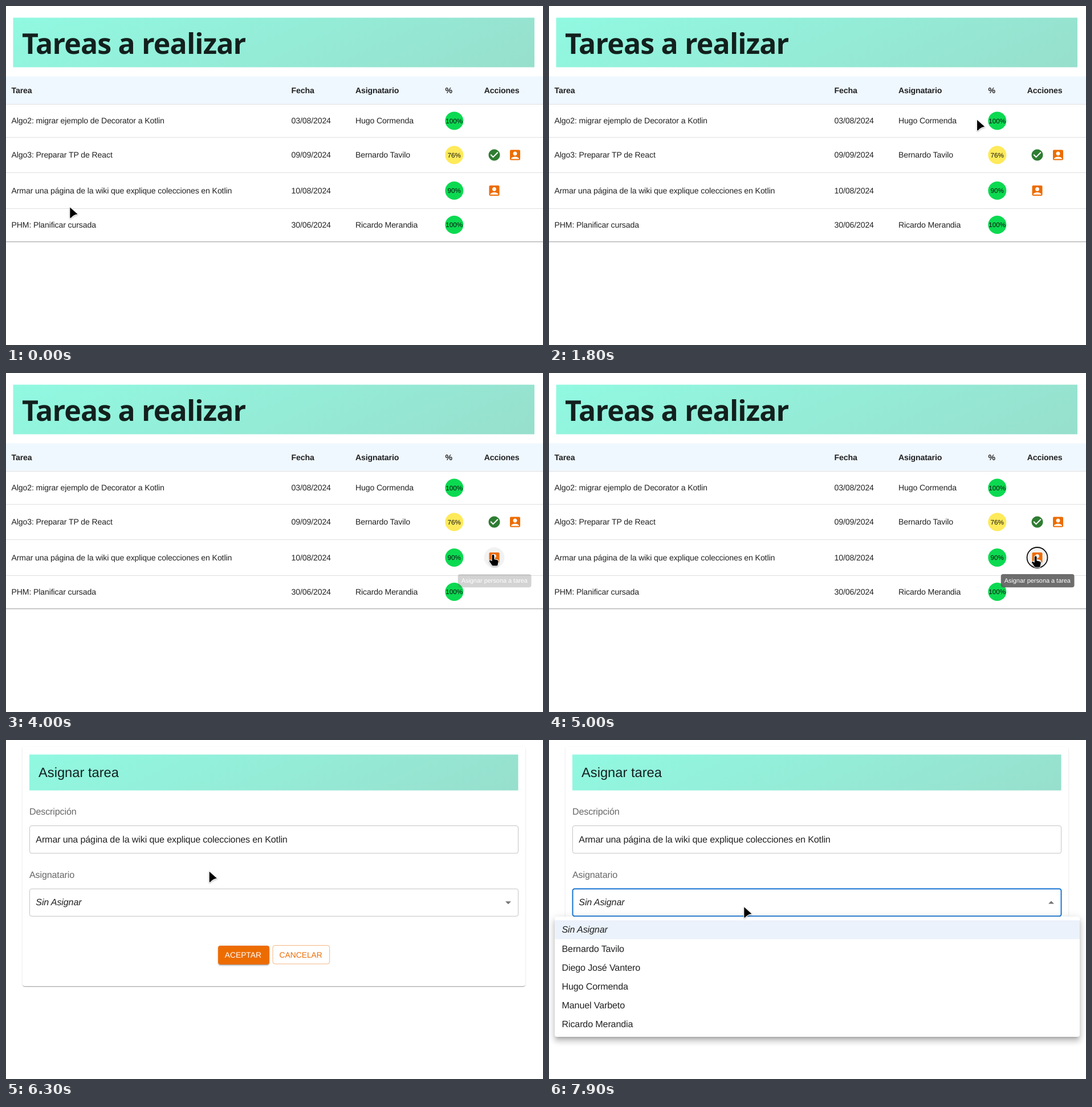
These frames come from a looping animation (942x595 px, 8000 ms). An HTML page:

```html
<!DOCTYPE html>
<html lang="es">
<head>
<meta charset="utf-8">
<title>Tareas a realizar</title>
<style>
  html, body { margin: 0; width: 100%; height: 100%; overflow: hidden; background: #fff; }
  #stage { position: relative; width: 942px; height: 595px; overflow: hidden; background: #fff; }
  #stage div, #stage svg { position: absolute; }
  #stage svg { left: 0; top: 0; overflow: visible; }
  .screen { left: 0; top: 0; width: 942px; height: 595px; }
  #card { left: 28.5px; top: 12px; width: 882.5px; height: 420px; border-radius: 4px;
    box-shadow: 0 2px 1px -1px rgba(0,0,0,.2), 0 1px 1px rgba(0,0,0,.14), 0 1px 3px rgba(0,0,0,.12); }
  #accept { left: 371.5px; top: 360.5px; width: 90px; height: 33px; border-radius: 4px; background: #ed6c02;
    box-shadow: 0 3px 1px -2px rgba(0,0,0,.2), 0 2px 2px rgba(0,0,0,.14), 0 1px 5px rgba(0,0,0,.12); }
  #menu { left: 9.5px; top: 310px; width: 921px; height: 211px; border-radius: 4px; background: #fff;
    transform-origin: 460.5px -5px;
    box-shadow: 0 5px 5px -3px rgba(0,0,0,.2), 0 8px 10px 1px rgba(0,0,0,.14), 0 3px 14px 2px rgba(0,0,0,.12); }
  text { font-family: "Liberation Sans", Arial, sans-serif; fill: rgba(0,0,0,.87);
    text-rendering: geometricPrecision; white-space: pre; }
  .cell { font-size: 14.1px; letter-spacing: -.12px; }
  .head { font-weight: 700; }
  .pct { font-size: 11.7px; text-anchor: middle; fill: #111; }
  .title { font: 700 50px "Noto Sans", "Open Sans", sans-serif; letter-spacing: -.85px; }
  .h5 { font-size: 23.7px; }
  .body { font-size: 16.1px; letter-spacing: -.14px; }
  .label { fill: rgba(0,0,0,.6); }
  .it { font-style: italic; }
  .btn { font-size: 13.8px; }
  .tip { font-size: 10.9px; fill: #fff; }
  .field { fill: none; stroke: #c4c4c4; }
  #cursor path { stroke-linejoin: round; }
  #cursor { filter: drop-shadow(0 1px 1px rgba(0,0,0,.3)); }
</style>
</head>
<body>
<div id="stage">
  <div id="list" class="screen">
    <svg id="listArt" width="942" height="595"></svg>
  </div>
  <div id="form" class="screen">
    <div id="card"></div>
    <div id="accept"></div>
    <svg id="formArt" width="942" height="595"></svg>
  </div>
  <div id="menu"><svg id="menuArt" width="921" height="211"></svg></div>
  <svg id="cursor" width="942" height="595"></svg>
</div>
<script>
const $ = id => document.getElementById(id);
const text = (x, y, s, cls) => `<text x="${x}" y="${y}" class="${cls}">${s}</text>`;
const rect = (x, y, w, h, attrs) => `<rect x="${x}" y="${y}" width="${w}" height="${h}" ${attrs}/>`;
const icon = (x, y, d, color) => `<path transform="translate(${x - 12} ${y - 12})" d="${d}" fill="${color}"/>`;

// Mint band with a slanted gradient that runs from corner to corner
function banner(id, x, y, w, h) {
  const a = 155 * Math.PI / 180, dx = Math.sin(a), dy = -Math.cos(a);
  const half = (w * dx + h * dy) / 2, cx = x + w / 2, cy = y + h / 2;
  return `<linearGradient id="${id}" gradientUnits="userSpaceOnUse" x1="${cx - dx * half}" y1="${cy - dy * half}"
    x2="${cx + dx * half}" y2="${cy + dy * half}"><stop stop-color="#91f9e1"/><stop offset="1" stop-color="#97dfcd"/>
    </linearGradient>` + rect(x, y, w, h, `fill="url(#${id})"`);
}

const GREEN = '#0bda51', YELLOW = '#feea5a', ORANGE = '#ed6c02';
const PERSON = 'M19 3H5c-1.11 0-2 .9-2 2v14c0 1.1.89 2 2 2h14c1.1 0 2-.9 2-2V5c0-1.1-.9-2-2-2z' +
  'm-7 3c1.93 0 3.5 1.57 3.5 3.5S13.93 13 12 13s-3.5-1.57-3.5-3.5S10.07 6 12 6z' +
  'm7 13H5v-.23c0-.62.28-1.2.76-1.58C7.47 15.82 9.64 15 12 15s4.53.82 6.24 2.19c.48.38.76.97.76 1.58V19z';
const CHECK = 'M12 2C6.48 2 2 6.48 2 12s4.48 10 10 10 10-4.48 10-10S17.52 2 12 2z' +
  'm-2 15l-5-5 1.41-1.41L10 14.17l7.59-7.59L19 8l-9 9z';

const people = ['Bernardo Tavilo', 'Diego José Vantero', 'Hugo Cormenda', 'Manuel Varbeto', 'Ricardo Merandia'];
const wiki = 'Armar una página de la wiki que explique colecciones en Kotlin';
const columns = [9.5, 500.5, 613];
const rows = [
  { y: 201.5, end: 230.5, pct: 100, cells: ['Algo2: migrar ejemplo de Decorator a Kotlin', '03/08/2024', people[2]] },
  { y: 261.5, end: 292.5, pct: 76, cells: ['Algo3: Preparar TP de React', '09/09/2024', people[0]] },
  { y: 324, end: 355.5, pct: 90, cells: [wiki, '10/08/2024', ''] },
  { y: 384, end: 413.5, pct: 100, cells: ['PHM: Planificar cursada', '30/06/2024', people[4]] }
];

function drawList() {
  let s = banner('listMint', 12.5, 20.5, 914.5, 87) + text(28, 84, 'Tareas a realizar', 'title') +
    rect(0, 123.5, 942, 49, 'fill="#f0f8ff"');
  ['Tarea', 'Fecha', 'Asignatario', '%', 'Acciones'].forEach((h, i) => {
    s += text([...columns, 770.5, 838.7][i], 152.7, h, 'cell head');
  });
  s += rect(0, 172, 942, 1, 'fill="#e0e0e0"');
  rows.forEach((r, i) => {
    const last = i === rows.length - 1;
    s += rect(0, r.end - .5, 942, last ? 1.5 : 1, `fill="${last ? '#b8b8b8' : '#e0e0e0'}"`);
    r.cells.forEach((c, k) => { s += text(columns[k], r.y + 4.9, c, 'cell'); });
    s += `<circle cx="786.3" cy="${r.y}" r="16" fill="${r.pct < 80 ? YELLOW : GREEN}"/>`;
    s += text(786.3, r.y + 4.2, r.pct + '%', 'pct');
  });
  s += '<circle id="ring" cx="856.5" cy="324" r="18"/>';
  s += icon(856.5, 261.5, CHECK, '#2e7d32') + icon(893, 261.5, PERSON, ORANGE) + icon(856.5, 324, PERSON, ORANGE);
  s += '<g id="tooltip">' + rect(792.7, 353, 128.8, 23.3, 'rx="4" fill="rgba(97,97,97,.92)"') +
    text(798.7, 368, 'Asignar persona a tarea', 'tip') + '</g>';
  $('listArt').innerHTML = s;
}

function drawForm() {
  $('formArt').innerHTML =
    banner('formMint', 41, 25.5, 857.5, 63) +
    text(57, 65, 'Asignar tarea', 'h5') +
    text(41, 131, 'Descripción', 'body label') +
    rect(41.5, 150.5, 857, 48.3, 'rx="3.5" class="field" id="desc"') +
    text(52.3, 179.5, wiki, 'body') +
    text(41, 242, 'Asignatario', 'body label') +
    rect(41.5, 261.3, 857, 48, 'rx="3.5" class="field" id="select"') +
    text(52.3, 290, 'Sin Asignar', 'body it') +
    '<path id="caret" fill="#757575"/>' +
    `<text x="383.8" y="382" class="btn" style="fill:#fff">ACEPTAR</text>` +
    rect(468, 360.5, 99.7, 32.5, 'rx="4" fill="none" stroke="rgba(237,108,2,.5)"') +
    `<text x="479.6" y="382" class="btn" style="fill:${ORANGE}">CANCELAR</text>`;
}

function drawMenu() {
  let s = rect(0, 6.5, 921, 33, 'fill="#ebf2fb"');
  ['Sin Asignar', ...people].forEach((p, i) => {
    s += text(12.5, 28.4 + 33.2 * i, p, i ? 'body' : 'body it');
  });
  $('menuArt').innerHTML = s;
}

const shapes = {
  arrow: 'M0 0L13.2 11.8Q6.5 12.6 1.6 18.2Q0 19 0 17.4z',
  hand: 'M-1.8 1.6a1.9 1.9 0 0 1 3.8 0V8l5.5 1.3q2 .6 1.8 2.8l-1 5q-.2 2.2-1.2 2.2h-7q-1.5 0-2.3-1.5' +
    'l-4-6q-1-1.7.6-2.2q1.6-.3 3.8 2z',
  beam: 'M-3.5-9.5Q-.7-9.5 0-8Q.7-9.5 3.5-9.5M0-8V8M-3.5 9.5Q-.7 9.5 0 8Q.7 9.5 3.5 9.5'
};

function drawCursor() {
  $('cursor').innerHTML = Object.entries(shapes).map(([k, d]) => k === 'beam'
    ? `<g id="beam" fill="none"><path d="${d}" stroke="#fff" stroke-width="3"/><path d="${d}" stroke="#000" stroke-width="1.3"/></g>`
    : `<g id="${k}"><path d="${d}" stroke="#fff" stroke-width="2"/><path d="${d}"/></g>`).join('');
}

// Pointer moves: first step, last step, x, y
const STEP = 100, LOOP = 8000;
const home = [112.3, 353.5];
const moves = [
  [400, 700, 247, 240.5], [1000, 1200, 629.5, 206.5], [1500, 1800, 751, 200],
  [2300, 2400, 765, 211.5], [2900, 2900, 826, 238], [3500, 3900, 854, 318],
  [4000, 4200, 855, 321], [4300, 4300, 853.5, 321.5], [5300, 5300, 690, 285],
  [5400, 5400, 480, 168], [5500, 5500, 420, 201], [5700, 5900, 369, 181.5],
  [6100, 6100, 369.5, 181.5], [6300, 6300, 356.7, 231], [6400, 6700, 349.3, 273],
  [7900, 7900, 342.3, 293.3]
];
const looks = [
  [0, 'arrow'], [1200, 'beam'], [1700, 'arrow'], [3900, 'hand'], [5100, 'arrow'], [5300, 'hand'],
  [5400, 'arrow'], [5700, 'beam'], [6300, 'arrow'], [6600, 'hand'], [7000, 'arrow']
];
const tipFade = [[0, 0], [4000, .3], [4100, .8], [4200, 1]];
// Menu opening: time, opacity, growth
const opening = [[0, 0, 0], [7000, .05, .5], [7100, .3, .856], [7200, .65, .96], [7300, .9, .99], [7400, 1, 1]];

const at = (table, t) => table.filter(r => r[0] <= t).pop();
const within = (t, a, b) => t >= a && t < b;

function pointer(t) {
  let [x, y] = home;
  for (const [a, b, nx, ny] of moves) {
    if (t < a) break;
    const p = Math.min(1, (t - a + STEP) / (b - a + STEP));
    x += (nx - x) * p;
    y += (ny - y) * p;
  }
  return [x, y];
}

function render(now) {
  const t = Math.floor(now % LOOP / STEP) * STEP;
  const onForm = t >= 5100, open = t >= 7000;
  $('list').style.display = onForm ? 'none' : '';
  $('form').style.display = onForm ? '' : 'none';

  $('ring').setAttribute('fill', t >= 3900 ? '#f2f2f2' : 'none');
  $('ring').setAttribute('stroke', t >= 5000 ? '#111' : 'none');
  $('ring').setAttribute('stroke-width', 1.8);
  $('tooltip').style.opacity = at(tipFade, t)[1];

  const dark = '#212121', grey = '#c4c4c4';
  const selHover = within(t, 5300, 5400) || within(t, 6600, 7000);
  $('desc').style.stroke = within(t, 5700, 6300) ? dark : grey;
  $('select').style.stroke = open ? '#1976d2' : selHover ? dark : grey;
  $('select').style.strokeWidth = open ? 2 : 1;
  $('caret').setAttribute('d', open ? 'M876 287.5h10l-5-5z' : 'M876 283.3h10l-5 5z');

  const [, alpha, grow] = at(opening, t);
  $('menu').style.display = open ? '' : 'none';
  $('menu').style.opacity = alpha;
  $('menu').style.transform = grow === 1 ? 'none' : `scale(${.75 + .25 * grow}, ${.5625 + .4375 * grow})`;

  const [x, y] = pointer(t), look = at(looks, t)[1];
  for (const k in shapes) {
    $(k).style.display = k === look ? '' : 'none';
    $(k).setAttribute('transform', `translate(${x} ${y})`);
  }
}

drawList();
drawForm();
drawMenu();
drawCursor();
const start = performance.now();
function tick() {
  render(performance.now() - start);
  requestAnimationFrame(tick);
}
tick();
</script>
</body>
</html>
```
